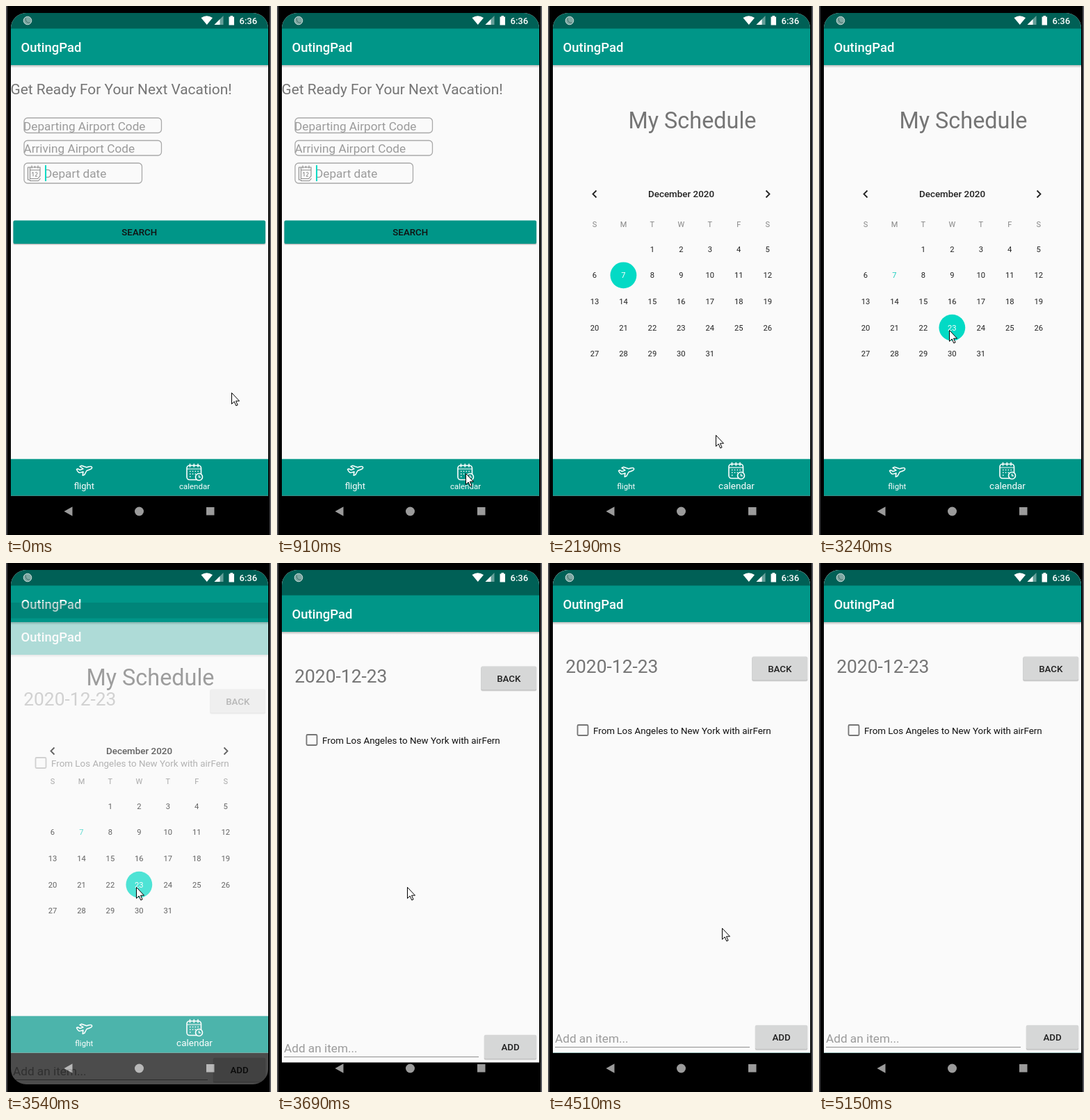
An HTML page for the animation above (5.73 s loop, 381 px wide and 761 px high).

```html
<!DOCTYPE html>
<html lang="en">
<head>
<meta charset="utf-8">
<title>Trip planner</title>
<style>
  html, body { margin: 0; width: 100%; height: 100%; overflow: hidden; background: #000; }
  svg { display: block; width: 100%; height: 100%; }
  text { font-family: Roboto, sans-serif; white-space: pre; }
</style>
</head>
<body>
<svg id="stage" viewBox="0 0 381 761"></svg>
<script>
const LOOP = 5730;
const TEAL = '#009688', DARK = '#006056', ACCENT = '#03dac5', PAPER = '#fafafa', HINT = '#9b9b9b';

// Markup helpers
const text = (x, y, size, fill, str, extra = '') =>
  `<text x="${x}" y="${y}" font-size="${size}" fill="${fill}" ${extra}>${str}</text>`;
const mid = (x, y, size, fill, str, extra = '') =>
  text(x, y, size, fill, str, `text-anchor="middle" ${extra}`);
const rect = (x, y, w, h, fill, extra = '') =>
  `<rect x="${x}" y="${y}" width="${w}" height="${h}" fill="${fill}" ${extra}/>`;
const line = (d, color, width, extra = '') =>
  `<path d="${d}" fill="none" stroke="${color}" stroke-width="${width}" ${extra}/>`;
const MEDIUM = 'font-weight="500"';
const ROUND = 'stroke-linejoin="round" stroke-linecap="round"';

const field = (y, w, h) =>
  rect(26, y, w, h, 'none', 'rx="5" stroke="#a9a9a9" stroke-width="1.3"');

function button(x, y, w, h, fill, label, color) {
  return rect(x - 0.5, y + 0.5, w + 1, h + 1.5, '#000', 'rx="2.5" opacity=".1"') +
    rect(x, y + 1, w, h, '#000', 'rx="2" opacity=".18"') +
    rect(x, y, w, h, fill, 'rx="2"') +
    mid(x + w / 2, y + h / 2 + 5, 13.3, color, label, MEDIUM);
}

// Status strip, title bar and empty page shared by every screen
const page = body =>
  rect(7, 10, 370, 694.5, PAPER) + body +
  rect(7, 85, 370, 4, 'url(#shade)') +
  rect(7, 10, 370, 23, DARK) + rect(7, 32.5, 370, 52.5, TEAL) +
  text(21.5, 66, 18.5, '#fff', 'OutingPad', MEDIUM);

const dateIcon =
  line('M34 232h-2.5v18h3M34.5 250v1.5h12M34.5 232h14.5v12.5l-3.5 4H34.5zM46.500 251.500l3-3.500M37 229.500v4M41.500 230v3M46 229.500v4M34.500 236h14.500', '#8c8c8c', 1.1) +
  line('M37 240.500l2-1.500v6M42 240q3-2 3 1l-3 4h3', '#8c8c8c', 1);

const searchScreen = page(
  text(6.5, 126.5, 20.9, '#757575', 'Get Ready For Your Next Vacation!') +
  field(161, 197.5, 21.5) + field(193.5, 197.5, 21.5) + field(226, 169.5, 29) +
  text(25, 179, 17.2, HINT, 'Departing Airport Code') +
  text(25.5, 211, 17.2, HINT, 'Arriving Airport Code') +
  dateIcon + text(55, 247, 17.2, HINT, 'Depart date') +
  rect(56, 229, 2, 23, ACCENT, 'id="caret"') +
  button(10.5, 308.5, 362.5, 33.5, TEAL, 'SEARCH', '#111'));

const colX = c => 67 + c * 41.45;
const rowY = r => 349.6 + r * 37.7;

function calendar() {
  let out = mid(191.5, 275, 13.4, '#212121', 'December 2020', MEDIUM);
  out += line('M69.5 265.5l-5 5 5 5M313.5 265.5l5 5-5 5', '#222', 1.8);
  [...'SMTWTFS'].forEach((d, c) => out += mid(colX(c), 317.6, 11, '#858585', d));
  out += `<circle id="press" cx="${colX(3)}" cy="${rowY(3)}" r="18.9" fill="${ACCENT}" opacity=".3"/>`;
  out += `<circle id="chosen" r="18.9" fill="${ACCENT}"/>`;
  for (let day = 1; day <= 31; day++) {
    const cell = day + 1;
    out += mid(colX(cell % 7), rowY(Math.floor(cell / 7)) + 4, 11.2, '#222', day, `id="day${day}"`);
  }
  return out;
}

const scheduleScreen = page(mid(207.5, 176, 32.4, '#757575', 'My Schedule') + calendar());

const planeIcon = line('M-10.5-1.500l2-.7 3 1.700 4.500-1.600L-6-5.500l2.800-1.200L4-4.200 7-5.300C9.500-6 11.500-5.500 11.700-4 11.700-2.600 10-1.700 8-1L4 .5.8 6.300l-2.600 1 .8-5.300L-6 3.400C-8 3.200-9.500 1-10.500-1.500z',
  '#fff', 1.5, ROUND);

function monthIcon() {
  let dots = '';
  for (let i = 0; i < 9; i++)
    dots += rect(-7 + (i % 4) * 3.8, -1.8 + Math.floor(i / 4) * 3.8, 1.5, 1.5, '#fff');
  return rect(-11, -9.5, 20.5, 20.5, 'none', 'rx="4" stroke="#fff" stroke-width="1.6"') +
    line('M-11-4.500H9.500', '#fff', 1.2) +
    line('M-6.500-11.500v4M-.7-11.500v4M5-11.500v4', '#fff', 1.6, ROUND) + dots +
    `<circle cx="6.500" cy="7" r="5" fill="${TEAL}" stroke="#fff" stroke-width="1.6"/>` +
    line('M6.500 4.300V7.300H9', '#fff', 1.3);
}

const tabs = rect(7, 651.7, 370, 52.8, TEAL) +
  `<g id="plane">${planeIcon}</g><g id="month">${monthIcon()}</g>` +
  mid(112.3, 694.6, 13, '#fff', 'flight', 'id="flight"') +
  mid(271, 694.8, 11.5, '#fff', 'calendar', 'id="calendar"');

const dayScreen = page(
  text(25.2, 157.5, 26.4, '#757575', '2020-12-23') +
  button(293.5, 134.5, 79.5, 34, '#d6d7d7', 'BACK', '#212121') +
  rect(42.5, 233, 15, 15, 'none', 'rx="1.5" stroke="#757575" stroke-width="1.8"') +
  text(65, 245.6, 13.4, '#111', 'From Los Angeles to New York with airFern') +
  text(10, 689.5, 17.2, HINT, 'Add an item...') +
  rect(10, 696, 280, 1, '#8f8f8f') +
  button(298, 664.7, 75, 34.5, '#d6d7d7', 'ADD', '#212121'));

const statusIcons =
  '<circle cx="31" cy="21" r="5.8" fill="#7fa9a4" stroke="#c3d6d3" stroke-width="1"/>' +
  line('M28.5 17.5a5 5 0 0 0 6 6.5', '#547f79', 1.2) +
  '<path d="M280.5 17q8-5.5 16.5 0L288.8 27z" fill="#fff"/>' +
  '<path d="M299.5 27l13-13v13z" fill="#fff" opacity=".4"/><path d="M299.5 27l8-8v8z" fill="#fff"/>' +
  '<path d="M320.5 15.5h2V14h3.5v1.5h2V27.5h-7.5z" fill="#fff"/>' +
  text(335.5, 26, 13, '#fff', '6:36', MEDIUM);

const systemKeys =
  '<g fill="#9b9b9b"><path d="M83.5 727l12-6.8v13.6z"/><circle cx="191.5" cy="727" r="6.5"/>' +
  rect(288, 721, 11.5, 11.5, '#9b9b9b') + '</g>';

document.getElementById('stage').innerHTML =
  `<defs>
    <clipPath id="glass"><rect x="7" y="10" width="370" height="740" rx="22"/></clipPath>
    <linearGradient id="shade" x2="0" y2="1">
      <stop offset="0" stop-opacity=".25"/><stop offset="1" stop-opacity="0"/>
    </linearGradient>
  </defs>` +
  rect(0, 0, 381, 761, '#000') +
  rect(0, 0, 2, 761, '#4a4a4f') + rect(379, 0, 2, 761, '#5a5a5f') +
  `<g clip-path="url(#glass)">
    <g id="search">${searchScreen}</g><g id="schedule">${scheduleScreen}</g>
    ${tabs}${systemKeys}<g id="day">${dayScreen}</g>${statusIcons}
  </g>
  <path id="pointer" d="M.5.5v16l3.7-3.5 2.6 6 2.3-1-2.6-5.800h5z" fill="#fff" stroke="#000"/>`;

const $ = id => document.getElementById(id);
const set = (id, attrs) => { for (const k in attrs) $(id).setAttribute(k, attrs[k]); };
const show = (id, on) => set(id, { display: on ? 'inline' : 'none' });

// Pointer stops: time, x, y
const stops = [
  [0, 324, 556], [280, 321, 561], [400, 311, 581], [520, 301, 596],
  [670, 296, 610], [790, 282, 648], [910, 271, 672], [1050, 270, 677],
  [2040, 266, 669], [2190, 241, 617], [2310, 199, 562],
  [2450, 195, 530], [2570, 190, 500], [2690, 187, 481], [2850, 187, 473], [2970, 187, 466],
  [4120, 194, 458], [4270, 201, 454], [4390, 220, 474], [4510, 250, 525], [4630, 280, 583], [4750, 297, 614],
  [4900, 303, 676], [5030, 309, 749], [5150, 312, 780]
];
// Opening of the day screen: time, opacity, offset
const opening = [[0, 0, 59], [3540, 0.3, 47], [3690, 1, 14], [3840, 1, 0]];

const at = (list, t) => list.reduce((now, step) => step[0] <= t ? step : now);

function draw(t) {
  const [, px, py] = at(stops, t);
  set('pointer', { transform: `translate(${px} ${py})` });

  show('search', t < 1480);
  show('schedule', t >= 1480);
  show('caret', t < 280 || (t >= 790 && t < 1330));

  const moved = t >= 1610;
  const grow = t >= 1760 ? 1 : moved ? 0.5 : 0;
  set('plane', { transform: `translate(112 ${moved ? 670 : 668})` });
  set('month', { transform: `translate(271 ${moved ? 668.5 : 670.5})` });
  set('flight', { 'font-size': 13 - 1.5 * grow });
  set('calendar', { 'font-size': 11.5 + 2 * grow });

  const picked = t >= 3240;
  show('press', t >= 3110 && !picked);
  set('chosen', { cx: colX(picked ? 3 : 1), cy: rowY(picked ? 3 : 1) });
  set('day7', { fill: picked ? '#20cfc0' : '#fff' });
  set('day23', { fill: picked ? '#fff' : '#222' });

  const [, alpha, shift] = at(opening, t);
  show('day', alpha > 0);
  set('day', { opacity: alpha, transform: `translate(0 ${shift})` });
}

const start = performance.now();
function tick() {
  draw((performance.now() - start) % LOOP);
  requestAnimationFrame(tick);
}
tick();
</script>
</body>
</html>
```
